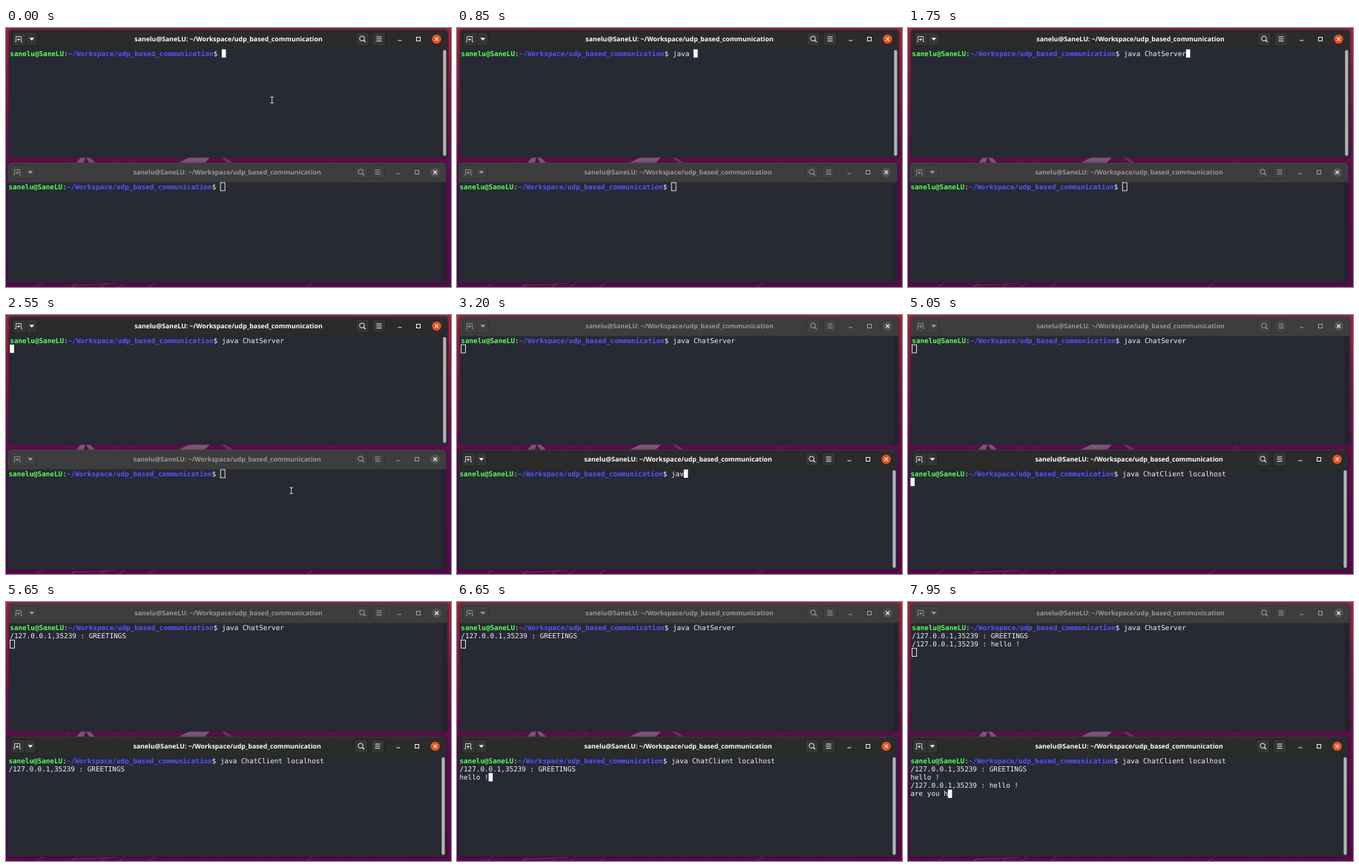
Animation, 600 px wide and 350 px high, one loop 8 s. Source, as an HTML page with a canvas:

```html
<!DOCTYPE html>
<html lang="en">
<head>
<meta charset="utf-8">
<title>Two terminals</title>
<style>
html, body { margin: 0; width: 600px; height: 350px; overflow: hidden; background: #560a4a; }
canvas { display: block; }
</style>
</head>
<body>
<canvas id="stage" width="600" height="350"></canvas>
<script>
const ctx = document.getElementById('stage').getContext('2d');
const LOOP = 8000, CELL = 5.6, ROW = 11.2, BLINK = 600;
const USER = 'sanelu@SaneLU', PATH = '~/Workspace/udp_based_communication';
const PROMPT_LEN = USER.length + PATH.length + 3;
const MONO = '"DejaVu Sans Mono", monospace';
const PEER = '/127.0.0.1,35239 : ';

// Each typed run: text, time of the first key, time between keys
const SERVER_CMD = [['java ', 230, 130], ['ChatServer', 960, 80]];
const CLIENT_CMD = [['java ', 2950, 95], ['ChatClien', 3520, 85], ['t localhost', 4320, 60]];
const HELLO = [['hello !', 6070, 85]];
const ARE_YOU = [['are you ', 7240, 78], ['h', 7890, 60]];
const SERVER_ENTER = 2000, FOCUS = 2760, CLIENT_ENTER = 5020, GREETED = 5300, HELLO_ENTER = 7000;
const POINTER_BACK = 2100, POINTER_REST = 2480;

const RUNS = [...SERVER_CMD, ...CLIENT_CMD, ...HELLO, ...ARE_YOU];
const KEYS = [0, SERVER_ENTER, FOCUS, CLIENT_ENTER, HELLO_ENTER];
for (const [text, start, gap] of RUNS)
  for (let i = 0; i < text.length; i++) KEYS.push(start + i * gap);

function typed(runs, t) {
  return runs.map(([text, start, gap]) =>
    t < start ? '' : text.slice(0, Math.floor((t - start) / gap) + 1)).join('');
}

function cursorOn(t) {
  const last = Math.max(...KEYS.filter(k => k <= t));
  return (t - last) % (2 * BLINK) < BLINK;
}

function fill(color, x, y, w, h, r = 0) {
  ctx.fillStyle = color;
  ctx.beginPath();
  ctx.roundRect(x, y, w, h, r);
  ctx.fill();
}

function poly(color, ...pts) {
  ctx.fillStyle = color;
  ctx.beginPath();
  for (let i = 0; i < pts.length; i += 2) ctx.lineTo(pts[i], pts[i + 1]);
  ctx.fill();
}

function line(color, width, ...pts) {
  ctx.strokeStyle = color;
  ctx.lineWidth = width;
  ctx.beginPath();
  for (let i = 0; i < pts.length; i += 2) ctx.lineTo(pts[i], pts[i + 1]);
  ctx.stroke();
}

function write(text, x, y, color, weight = '') {
  ctx.font = `${weight} 9.3px ${MONO}`;
  ctx.fillStyle = color;
  ctx.fillText(text, x, y);
  return x + text.length * CELL;
}

function wallpaper() {
  const g = ctx.createLinearGradient(0, 0, 0, 350);
  g.addColorStop(0, '#a8243d');
  g.addColorStop(0.25, '#801a48');
  g.addColorStop(0.52, '#60104e');
  g.addColorStop(1, '#5a0850');
  fill(g, 0, 0, 600, 350);
  poly('#8a5a83', 101, 175, 107, 175, 105, 182, 95, 182);
  poly('#8a5a83', 108, 175, 113, 175, 120, 182, 112, 182);
  poly('#8a5a83', 247, 175, 275, 175, 268, 182, 233, 182);
  poly('#74386a', 290, 175, 295, 175, 306, 182, 299, 182);
  for (const x of [80, 148, 170, 437]) line('#76305f', 0.8, x, 182, x + 7, 175);
  for (const x of [40, 88, 128, 152, 192, 405]) line('#7c3a6c', 0.8, x, 350, x + 9, 344);
  line('#7c3a6c', 0.8, 88, 348, 150, 345);
}

function button(x, w, edge, face) {
  fill(edge, x, 5.5, w, 19, 3);
  fill(face, x + 0.8, 6.3, w - 1.6, 17.4, 2.4);
}

function titleBar(active) {
  const ink = active ? '#f2f2f2' : '#a0a0a0';
  const edge = active ? '#1c1c1c' : '#303030';
  const face = active ? '#353535' : '#404040';
  fill(active ? '#2b2b2b' : '#3d3d3d', 4, 2, 591.5, 26.5, [5, 5, 0, 0]);
  line(active ? '#414141' : '#484848', 0.7, 8, 2.5, 592, 2.5);

  button(8, 34.5, edge, face);
  line(edge, 0.8, 27, 6, 27, 24);
  line(ink, 0.8, 12, 18.5, 13.5, 18.5, 13.5, 11.5, 20.5, 11.5, 20.5, 18.5, 22, 18.5);
  line(ink, 0.9, 15, 15.5, 19, 15.5);
  line(ink, 0.9, 17, 13.5, 17, 17.5);
  poly(ink, 31.4, 13.2, 38.2, 13.2, 34.8, 17);

  ctx.font = 'bold 8.78px "Open Sans", sans-serif';
  ctx.fillStyle = active ? '#ffffff' : '#969696';
  ctx.textAlign = 'center';
  ctx.fillText(`${USER}: ${PATH}`, 300, 18);
  ctx.textAlign = 'left';

  button(471, 19, edge, face);
  ctx.strokeStyle = ink;
  ctx.lineWidth = 1;
  ctx.beginPath();
  ctx.arc(480, 14.2, 3.3, 0, 7);
  ctx.stroke();
  line(ink, 1.2, 482.3, 16.5, 484.8, 19);

  button(493.5, 19, edge, face);
  for (const y of [12, 14.8, 17.6]) line(ink, 1, 499.5, y, 506.5, y);

  line(ink, 1, 528.3, 16.9, 533.3, 16.9);
  ctx.strokeRect(553.5, 12.5, 5, 5);

  ctx.fillStyle = active ? '#e2531f' : '#535353';
  ctx.beginPath();
  ctx.arc(580.6, 15, 6.2, 0, 7);
  ctx.fill();
  line('#ffffff', 1.1, 578.3, 12.7, 582.9, 17.3);
  line('#ffffff', 1.1, 582.9, 12.7, 578.3, 17.3);
}

function terminal(dx, dy, bottom, active, rows, cursorVisible) {
  ctx.save();
  ctx.translate(dx, dy);
  ctx.shadowColor = 'rgba(0,0,0,.45)';
  ctx.shadowBlur = 5;
  fill('#272933', 4, 2, 591.5, bottom - 2, [5, 5, 0, 0]);
  ctx.shadowColor = 'transparent';
  titleBar(active);
  if (active) fill('#b4b4b2', 589.3, 29.8, 4.2, bottom - 32, 2);
  else fill('#22242c', 589, 28.5, 5.5, bottom - 29);

  const left = 5.3, top = 28.8, ink = '#f4f4f4';
  rows.forEach((row, i) => {
    const y = top + i * ROW + 8.8;
    let x = left;
    if (i === 0) {
      x = write(USER, x, y, '#55ff55', 'bold');
      x = write(':', x, y, ink);
      x = write(PATH, x, y, '#5555ff', 'bold');
      x = write('$ ', x, y, ink);
    }
    write(row, x, y, ink);
  });

  const n = rows.length - 1;
  const cx = left + (rows[n].length + (n ? 0 : PROMPT_LEN)) * CELL;
  const cy = top + n * ROW;
  if (!active) {
    ctx.strokeStyle = ink;
    ctx.lineWidth = 0.9;
    ctx.strokeRect(cx + 0.2, cy + 0.2, CELL + 0.4, ROW - 0.3);
  } else if (cursorVisible) {
    fill('#ffffff', cx, cy, CELL, ROW);
  }
  ctx.restore();
}

function pointer(t) {
  if (t >= SERVER_CMD[0][1] && t < POINTER_BACK || t >= CLIENT_CMD[0][1]) return;
  const p = Math.min(1, Math.max(0, (t - POINTER_BACK) / (POINTER_REST - POINTER_BACK)));
  const e = p * p * (3 - 2 * p);
  ctx.save();
  ctx.translate(358.7 + 26 * e, 97.2 + 140 * e);
  for (const [color, w] of [['#15161c', 2.6], ['#e8e8e8', 1]]) {
    line(color, w, 0, -4, 0, 4);
    line(color, w, -2.4, -4, 2.4, -4);
    line(color, w, -2.4, 4, 2.4, 4);
  }
  ctx.restore();
}

function serverRows(t) {
  const rows = [typed(SERVER_CMD, t)];
  if (t >= GREETED) rows.push(PEER + 'GREETINGS');
  if (t >= HELLO_ENTER) rows.push(PEER + 'hello !');
  if (t >= SERVER_ENTER) rows.push('');
  return rows;
}

function clientRows(t) {
  const rows = [typed(CLIENT_CMD, t)];
  if (t >= GREETED) rows.push(PEER + 'GREETINGS');
  if (t >= HELLO_ENTER) rows.push('hello !', PEER + 'hello !', typed(ARE_YOU, t));
  else if (t >= CLIENT_ENTER) rows.push(typed(HELLO, t));
  return rows;
}

function draw(t) {
  const onClient = t >= FOCUS, lit = cursorOn(t);
  wallpaper();
  terminal(0, 0, 175, !onClient, serverRows(t), lit);
  terminal(-1.9, 180, 164, onClient, clientRows(t), lit);
  pointer(t);
}

ctx.textRendering = 'geometricPrecision';
const begin = performance.now();
function tick() {
  draw((performance.now() - begin) % LOOP);
  requestAnimationFrame(tick);
}
tick();
</script>
</body>
</html>
```
